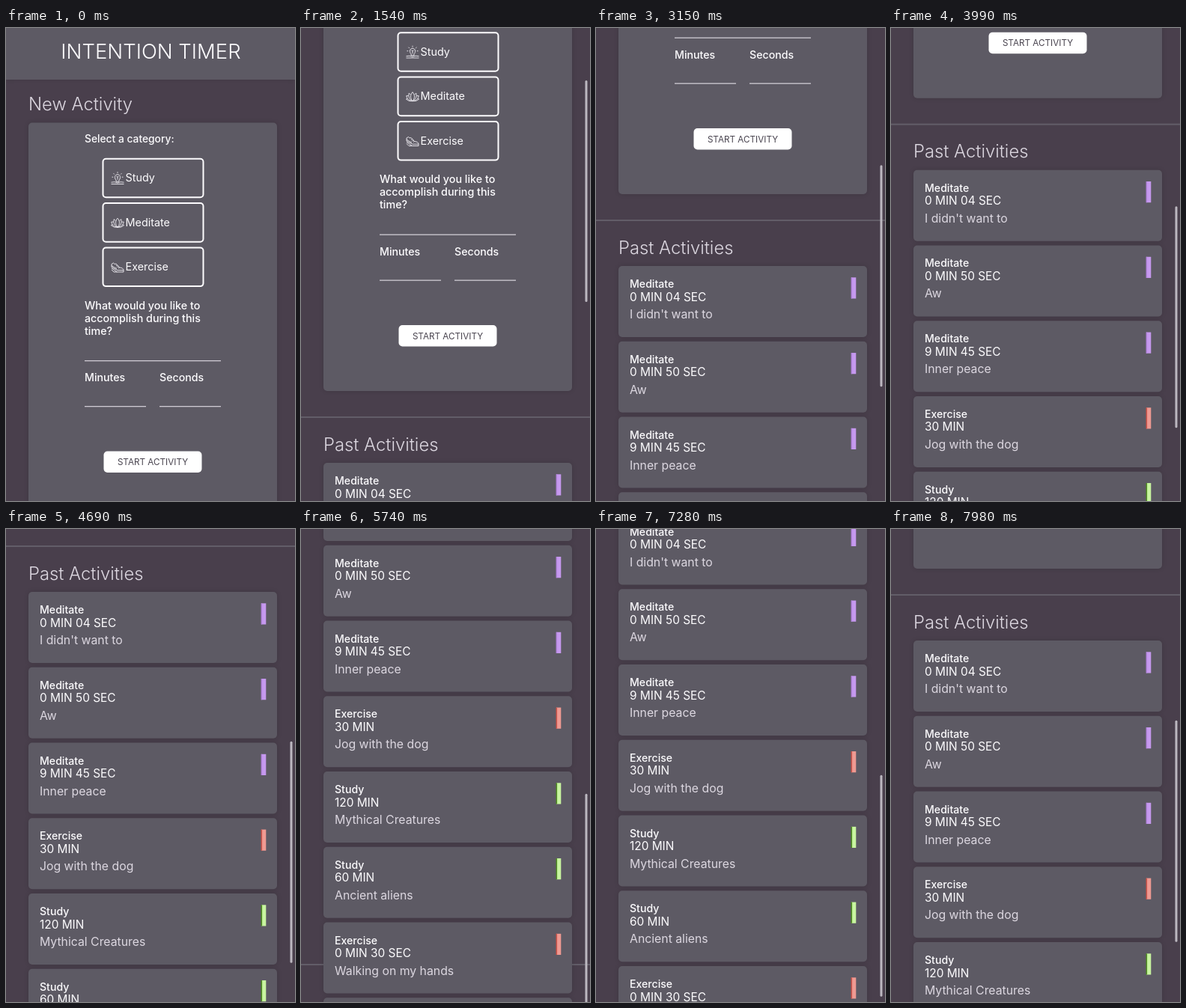
These frames come from a looping animation (386x632 px, 8000 ms). An HTML page with a canvas:

```html
<!DOCTYPE html>
<html lang="en">
<head>
<meta charset="utf-8">
<title>Intention Timer</title>
<style>
  html, body { margin: 0; width: 100%; height: 100%; overflow: hidden; background: #493f4c; }
  canvas { display: block; width: 386px; height: 632px; }
</style>
</head>
<body>
<canvas id="stage"></canvas>
<script>
const W = 386, H = 632, LOOP = 8000, STEP = 70;
const canvas = document.getElementById('stage');
const ctx = canvas.getContext('2d');
const dpr = window.devicePixelRatio || 1;
canvas.width = W * dpr;
canvas.height = H * dpr;

const BG = '#493f4c', PANEL = '#5d5a64', RULE = '#625d68';
const WHITE = '#fdfcfe', SOFT = '#dcd7e0', MUTED = '#cfcbd3';

// bar fill, bar left edge
const COLORS = {
  Meditate: ['#c699ef', '#b384dd'],
  Exercise: ['#ef9a92', '#cf5449'],
  Study: ['#c8f5a0', '#4e8a20']
};

const ACTIVITIES = [
  ['Meditate', '0 MIN 04 SEC', "I didn't want to"],
  ['Meditate', '0 MIN 50 SEC', 'Aw'],
  ['Meditate', '9 MIN 45 SEC', 'Inner peace'],
  ['Exercise', '30 MIN', 'Jog with the dog'],
  ['Study', '120 MIN', 'Mythical Creatures'],
  ['Study', '60 MIN', 'Ancient aliens'],
  ['Exercise', '0 MIN 30 SEC', 'Walking on my hands'],
  ['Meditate', '4 MIN', 'On the mountain top']
];

// time, scroll offset, speed (px per ms)
const SCROLL = [
  [700, 0, 0.15],
  [1540, 168.5, 0.18],
  [3150, 431.5, 0.157],
  [4690, 665.5, 0.153],
  [5740, 828.5, 0.22],
  [5950, 895, 0],
  [6020, 895, 0],
  [6650, 883, -0.1],
  [7980, 600.5, -0.22]
];

function scrollAt(t) {
  if (t <= SCROLL[0][0]) return 0;
  const i = SCROLL.findIndex(k => k[0] >= t);
  if (i < 0) return SCROLL[SCROLL.length - 1][1];
  const [t0, y0, v0] = SCROLL[i - 1], [t1, y1, v1] = SCROLL[i];
  const d = t1 - t0, u = (t - t0) / d, w = 1 - u;
  return y0 * (1 + 2 * u) * w * w + v0 * d * u * w * w
       + y1 * u * u * (3 - 2 * u) - v1 * d * u * u * w;
}

function rect(x, y, w, h, color) {
  ctx.fillStyle = color;
  ctx.fillRect(x, y, w, h);
}

function rounded(x, y, w, h, r, fill, stroke) {
  ctx.beginPath();
  ctx.roundRect(x, y, w, h, r);
  if (fill) { ctx.fillStyle = fill; ctx.fill(); }
  if (stroke) { ctx.strokeStyle = stroke; ctx.lineWidth = 2; ctx.stroke(); }
}

function panel(x, y, w, h, r) {
  ctx.save();
  ctx.shadowColor = 'rgba(0, 0, 0, 0.14)';
  ctx.shadowBlur = 6 * dpr;
  rounded(x, y, w, h, r, PANEL);
  ctx.restore();
}

function text(str, x, y, size, weight, color, align = 'left') {
  ctx.font = `${weight} ${size}px Inter, "Open Sans", sans-serif`;
  ctx.fillStyle = color;
  ctx.textAlign = align;
  ctx.fillText(str, x, y);
}

// Icons are drawn in an 18 x 18 box.
const ICONS = {
  Study: new Path2D('M7 11.5C4.5 9 5 4 9 4S13.500 9 11 11.500V13.500H7ZM9 11V7.500L7.500 6.500M9 7.500L10.500 6.500'
    + 'M9 .5V2.200M3.500 2.500L4.800 3.800M14.500 2.500L13.200 3.800M1.500 7.500H3.300M14.700 7.500H16.500'
    + 'M.5 14.500Q5 13.200 9 15.200Q13 13.200 17.500 14.500M.5 16.800H17.500'),
  Meditate: new Path2D('M9 3C5.500 7 6 12 9 15C12 12 12.500 7 9 3ZM6.500 6.500L4.200 4.500C3 9 5 13.500 9 15'
    + 'C13 13.500 15 9 13.800 4.500L11.500 6.500M3.500 8L.8 8C1.500 12 4.500 15 9 15C13.500 15 16.500 12 17.200 8L14.500 8'
    + 'M2 11.500L.5 12.500Q4 16 9 15Q14 16 17.500 12.500L16 11.500'),
  Exercise: new Path2D('M1 5L3.500 3.500Q5 6 7 4.500L11.500 9.500Q17 10 17 13.200H9L1 9ZM1 10.500L8.500 15.500H17V13.200'
    + 'M7 7.500L8.800 6.200M8.500 9L10.200 7.800M10 10.500L11.800 9.300M1 7Q5 10 8 11M1 12.500L4 15.500H8.500')
};

function icon(name, x, y) {
  ctx.save();
  ctx.translate(x, y);
  ctx.lineWidth = 0.9;
  ctx.lineJoin = 'round';
  ctx.strokeStyle = '#f2f0f5';
  ctx.stroke(ICONS[name]);
  ctx.restore();
}

function drawForm() {
  panel(0, 0, W, 69, 0);
  text('INTENTION TIMER', 193.5, 41, 27.5, 300, WHITE, 'center');
  text('New Activity', 30, 110, 23.8, 300, SOFT);
  panel(30, 126.5, 332, 527, 5);

  text('Select a category:', 105, 153, 13.8, 500, WHITE);
  ['Study', 'Meditate', 'Exercise'].forEach((name, i) => {
    const y = 174.7 + i * 59.4;
    rounded(129.5, y, 134, 51.6, 4, null, WHITE);
    icon(name, 140, y + 17);
    text(name, 159.5, y + 30.7, 14.4, 400, WHITE);
  });

  ['What would you like to', 'accomplish during this', 'time?'].forEach((line, i) =>
    text(line, 105, 375.5 + i * 17, 14.3, 500, WHITE));
  rect(105, 444, 182, 1.3, MUTED);
  text('Minutes', 105, 472, 14.2, 500, WHITE);
  text('Seconds', 205, 472, 14.2, 500, WHITE);
  rect(105, 505, 82, 1.3, MUTED);
  rect(205, 505, 82, 1.3, MUTED);

  rounded(130.5, 565.5, 131, 28.5, 5, '#fff');
  text('START ACTIVITY', 196, 584.2, 11.7, 400, '#49444f', 'center');
}

function drawActivity([name, time, note], i) {
  const y = 749.5 + i * 100.75;
  panel(30, y, 332, 95, 5);
  text(name, 45, y + 29, 14.1, 500, WHITE);
  text(time, 45, y + 46.5, 15.4, 400, WHITE);
  text(note, 45, y + 70, 15.8, 400, SOFT);
  const [fill, edge] = COLORS[name];
  rect(341, y + 15.3, 6.3, 28.2, fill);
  rect(340.6, y + 15.3, 1.5, 28.2, edge);
}

function drawHistory() {
  rect(0, 687.5, W, 2, RULE);
  text('Past Activities', 30, 733, 23.8, 300, SOFT);
  rect(0, 1409.5, W, 2, RULE);
  ACTIVITIES.forEach(drawActivity);
}

function draw(t) {
  const y = scrollAt(t);
  ctx.setTransform(dpr, 0, 0, dpr, 0, 0);
  rect(0, 0, W, H, BG);
  ctx.save();
  ctx.translate(0, -y);
  drawForm();
  drawHistory();
  ctx.restore();
  if (y > 0) rounded(379.5, 0.43 * y - 2.4, 3, 296, 1.5, '#bcb8c0');
}

const start = performance.now();
function tick() {
  const t = (performance.now() - start) % LOOP;
  draw(Math.floor(t / STEP) * STEP);
  requestAnimationFrame(tick);
}
tick();
</script>
</body>
</html>
```
